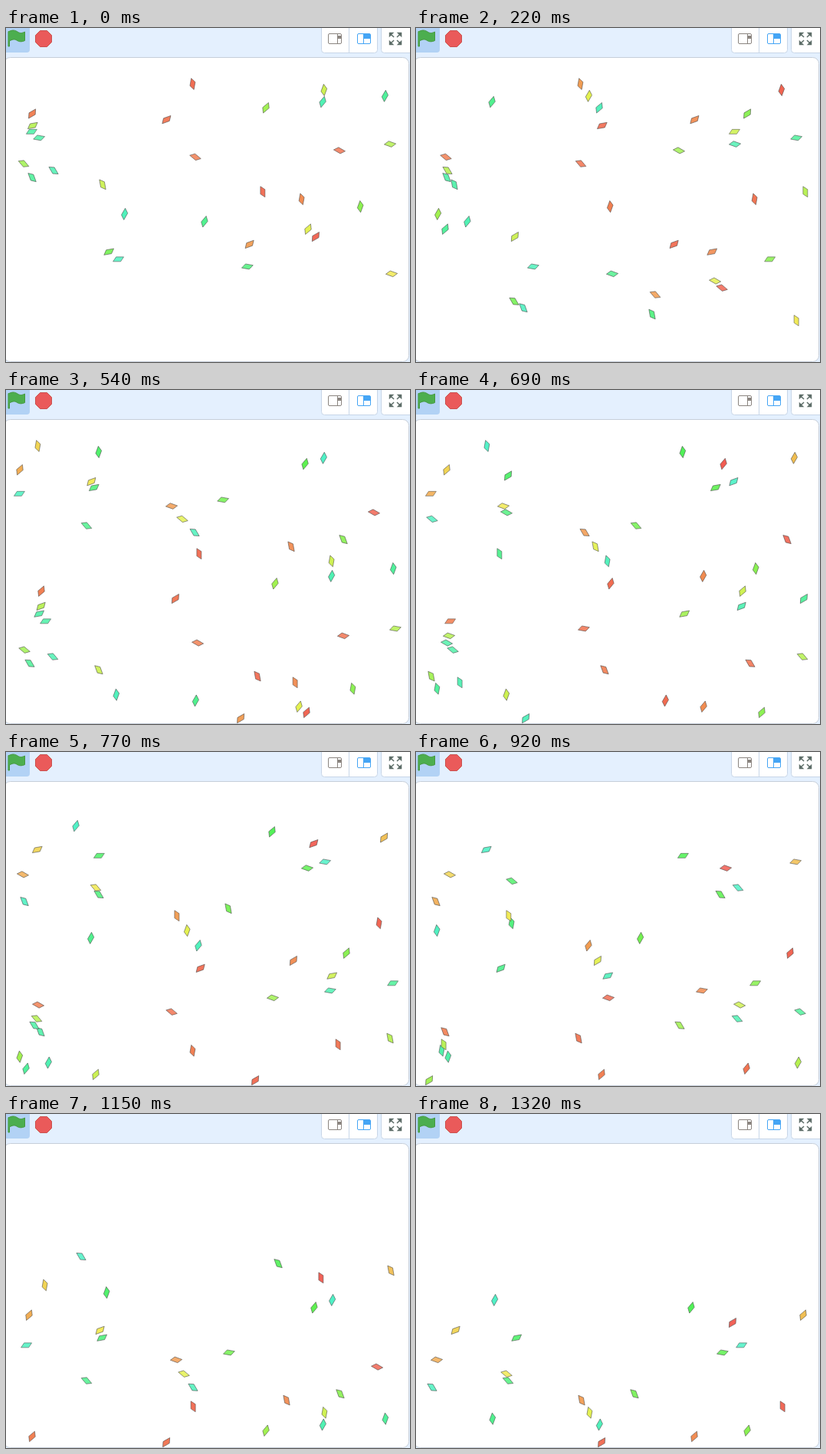
An HTML page for the animation above (1400 ms loop, 527 by 436 pixels).

```html
<!DOCTYPE html>
<html lang="en">
<head>
<meta charset="utf-8">
<title>Confetti</title>
<style>
  html, body { margin: 0; width: 100%; height: 100%; overflow: hidden; background: #e4f0fe; }
  svg { display: block; width: 527px; height: 436px; }
</style>
</head>
<body>
<svg viewBox="0 0 527 436">
  <defs>
    <clipPath id="inside"><rect x="-2" y="39" width="527" height="396" rx="8"/></clipPath>
  </defs>
  <rect width="527" height="436" fill="#e4f0fe"/>

  <!-- start and stop -->
  <path d="M0 0H31V28Q31 32 27 32H0Z" fill="#b2d2f5"/>
  <path d="M4 4.500C9 2 12 3 15 5S21 7 24.500 5V16.500C20 18.500 17 18 14 16S8 15 4.500 17V24H3V4.500Z"
    fill="#4cae4f" stroke="#45993d" stroke-linejoin="round"/>
  <path d="M44.500 3.500H53.500L59.500 9.500V18.500L53.500 24.500H44.500L38.500 18.500V9.500Z"
    fill="#ea5a5a" stroke="#c9514f" stroke-linejoin="round"/>

  <!-- view buttons -->
  <g fill="#fff" stroke="#c8d6e8">
    <rect x="411.500" y="-8" width="73" height="40.500" rx="4"/>
    <path d="M447.500 0V32"/>
    <rect x="489.500" y="-8" width="44" height="40.500" rx="4"/>
  </g>
  <g fill="none" stroke="#8b8580">
    <rect x="420.500" y="7.500" width="17" height="13" rx="1.500"/>
    <path d="M432.500 8V20"/>
    <rect x="433" y="10" width="4" height="4" fill="#8b8580" stroke="none"/>
  </g>
  <g fill="none" stroke="#45a5f5">
    <rect x="458.500" y="7.500" width="17" height="13" rx="1.500"/>
    <path d="M466.500 8V20"/>
    <rect x="467" y="8" width="8" height="6" fill="#45a5f5" stroke="none"/>
  </g>
  <g id="expand" fill="#5d6d68" stroke="#5d6d68"></g>

  <rect x="-2.500" y="38.500" width="528" height="397" rx="8" fill="#fff" stroke="#c6ced9"/>
  <g id="confetti" clip-path="url(#inside)" stroke="#444" stroke-opacity=".65" stroke-width=".8" stroke-linejoin="round"></g>
</svg>
<script>
const NS = 'http://www.w3.org/2000/svg';
const LOOP = 1400;
const LIFE = 41;           // steps a piece stays on the stage
const HEAD_START = 28;     // age of the first piece when the loop begins
const STEPS_PER_MS = 0.0308;

// Moments (ms) at which the screen updates; it holds still in between.
const updates = [0, 70, 150, 220, 300, 380, 460, 540, 600, 690, 770, 850, 920, 1010, 1070, 1150, 1230, 1320];

// Where each piece drops from: one per step, null for a skipped step.
const drops = [
  500, 311, 142, 129, 312, 398, 388, 253, 149, 457, 381, 331, 123, 32, 61, 23, 248,
  437, 504, 47, 38, 40, 215, 40, 345, 419, 500, 420, 248, 369, 438, 245, 105, 231,
  482, 219, 287, 22, 120, 117, null, 24, 396, 420, 126, 46, 407, 499, 353, 97
];

const wave = deg => Math.cos(deg * Math.PI / 180);

// Hues swing between red and aqua about every six pieces.
const hue = n => 84 + 80 * wave(61 * (n - 25.4));

function add(parent, name, attrs) {
  const el = document.createElementNS(NS, name);
  for (const key in attrs) el.setAttribute(key, attrs[key]);
  return parent.appendChild(el);
}

const expand = document.getElementById('expand');
for (let turn = 0; turn < 360; turn += 90) {
  add(expand, 'path', {
    d: 'M2 -2L6 -6M3.500 -7.500H7.500V-3.500Z',
    'stroke-width': 1.5,
    transform: `translate(508 14) rotate(${turn})`
  });
}

const layer = document.getElementById('confetti');
const pieces = drops
  .map((x, n) => ({ x, n }))
  .filter(p => p.x !== null)
  .map(p => ({ ...p, el: add(layer, 'path', { d: 'M-7 3L-3 -3H7L3 3Z' }) }));

// Each piece falls steadily, circles a little and turns ten degrees per step.
function place({ el, x, n }, step) {
  const age = HEAD_START - n + step;
  const live = age >= 0 && age <= LIFE;
  el.style.display = live ? '' : 'none';
  if (!live) return;
  const turn = 10 * (age - 4);
  const px = x - 6 * wave(turn);
  const py = 69 + 8.8 * age - 6.3 * wave(turn - 90);
  const light = 66 - 3 * wave(20 * (age - 2));
  el.setAttribute('transform', `translate(${px.toFixed(2)} ${py.toFixed(2)}) rotate(${turn - 40})`);
  el.setAttribute('fill', `hsl(${hue(n).toFixed(0)} 85% ${light.toFixed(1)}%)`);
}

function draw(ms) {
  const shown = updates.findLast(t => t <= ms);
  const step = Math.round(shown * STEPS_PER_MS);
  pieces.forEach(p => place(p, step));
}

let start;
function tick(now) {
  start ??= now;
  draw((now - start) % LOOP);
  requestAnimationFrame(tick);
}
draw(0);
requestAnimationFrame(tick);
</script>
</body>
</html>
```
